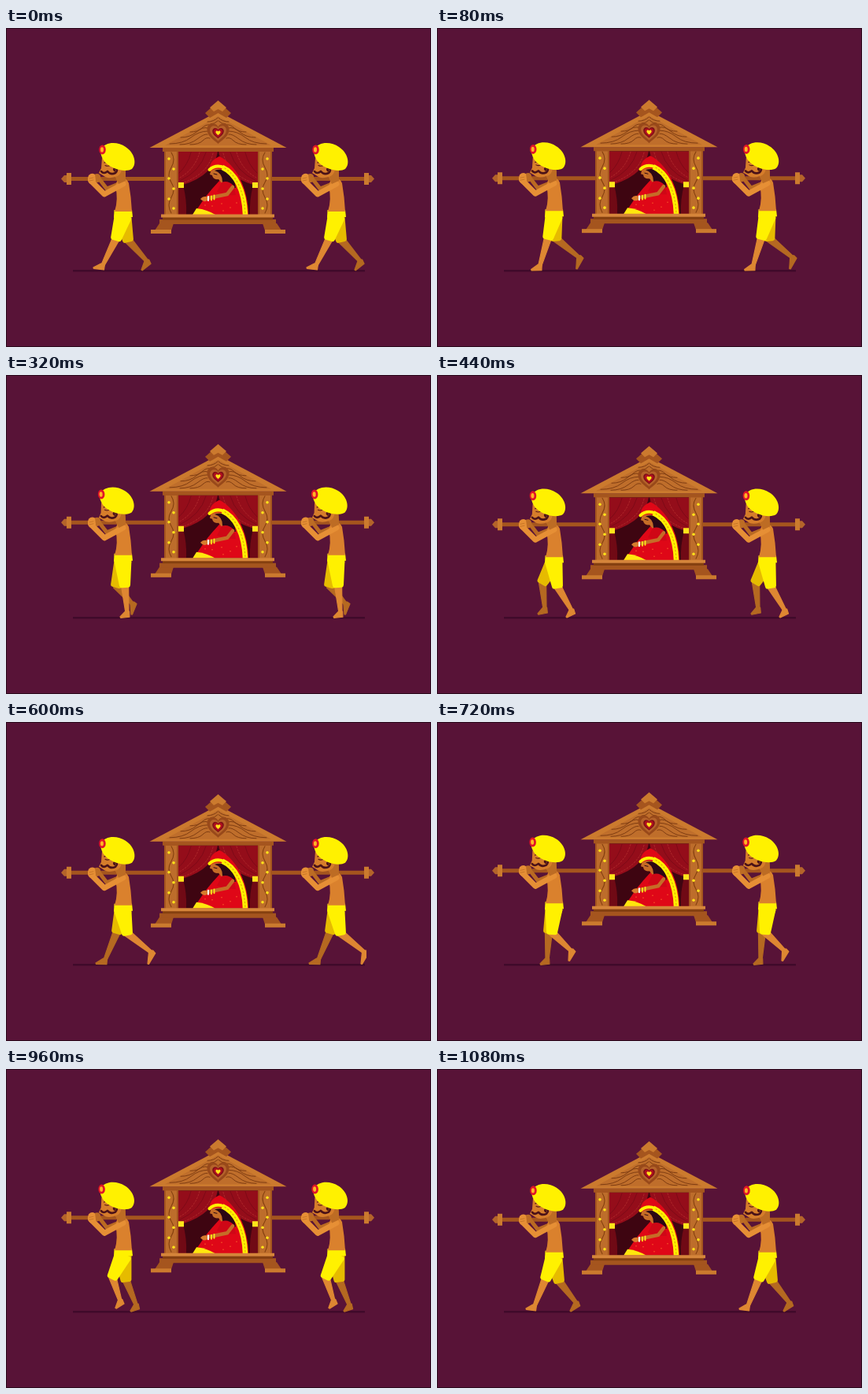
Recreate the animation shown at these times as an HTML page. Size 540x405 px, loop 1120 ms.

```html
<!DOCTYPE html>
<html lang="en">
<head>
<meta charset="utf-8">
<title>Palanquin</title>
<style>
  html, body { margin: 0; width: 100%; height: 100%; overflow: hidden; background: #581337; }
  svg { display: block; width: 100%; height: 100%; }
  .line { fill: none; stroke-linecap: round; stroke-linejoin: round; }
</style>
</head>
<body>
<svg viewBox="0 0 540 405">
  <defs>
    <clipPath id="window"><path d="M219 157H320V237H219Z"/></clipPath>
    <clipPath id="legArea"><path d="M60 200H458V320H60Z"/></clipPath>

    <g id="roofCarving" class="line" stroke="#7f3d12" stroke-width="1">
      <path d="M269 114Q264 119 256 119M269 118Q265 122 260 122"/>
      <path d="M234 132Q244 132 249 127T259 123"/>
      <path d="M222 139Q234 139 242 132T256 127"/>
      <path d="M208 147Q225 147 235 139T256 131"/>
      <path d="M221 148Q234 148 243 141T256 135"/>
      <path d="M234 148Q245 148 250 143T259 140"/>
    </g>

    <g id="side">
      <path d="M201 154H219V237H201Z" fill="#a5551e"/>
      <path d="M203 157H217V237H203Z" fill="#bd6d2b"/>
      <path class="line" d="M210 158Q216 167 210 177T210 196T210 215T210 235" stroke="#85400f" stroke-width="1.1"/>
      <g fill="#ffe21a">
        <circle cx="207" cy="166" r="1.8"/><circle cx="213" cy="179" r="1.8"/>
        <circle cx="207" cy="191" r="1.8"/><circle cx="213" cy="204" r="1.8"/>
        <circle cx="207" cy="217" r="1.8"/><circle cx="213" cy="229" r="1.8"/>
      </g>
      <path d="M195 248H213L210 257H189Z" fill="#a5551e"/>
      <path d="M184 256H210V261H184Z" fill="#cb7a2e"/>
    </g>

    <g id="curtain">
      <path d="M219 200H225Q230 218 229 237H219Z" fill="#700a15"/>
      <path d="M219 157H269Q264 187 225 199H219Z" fill="#940d1a"/>
      <path class="line" d="M254 158Q247 182 221 194M235 158Q231 174 220 184" stroke="#7b0a17" stroke-width=".9"/>
      <path class="line" d="M263 159Q257 185 224 197M246 158Q240 179 221 190" stroke="#b93431" stroke-width=".7" stroke-dasharray="2 2"/>
      <path d="M218 196H226V203H218Z" fill="#ffe51a"/>
    </g>

    <g id="bride">
      <path d="M271 163C262 167 258 173 259 181L272 193L262 204L253 215L238 237H308C308 204 292 173 271 163Z" fill="#df0717"/>
      <path d="M260 182Q267 176 278 181L283 190L274 197L270 192Q263 193 262 187L259 186Z" fill="#c66c27"/>
      <path d="M265 181Q281 176 290 193L292 203Q280 204 275 195Q275 184 265 181Z" fill="#2b0714"/>
      <path class="line" d="M264 185l4 1" stroke="#2b0714"/>
      <path d="M274 196Q282 193 289 200L292 212Q281 213 268 208Z" fill="#cf0716"/>
      <path class="line" d="M288 202L281 211L252 217" stroke="#c66c27" stroke-width="4.500"/>
      <path d="M247 217q4 -5 9 -2v4q-5 3 -9 -2" fill="#d77c2d"/>
      <path class="line" d="M257 214v5" stroke="#fff" stroke-width="2"/>
      <path class="line" d="M261 213.500v5M264.500 212.500v5" stroke="#ffe51a" stroke-width="1.8"/>
      <path class="line" d="M258.500 180Q266 173 277 177" stroke="#fff000" stroke-width="4"/>
      <path class="line" d="M275 177C291 184 303 205 304 237" stroke="#fff000" stroke-width="6.500" style="stroke-linecap:butt"/>
      <path class="line" d="M278 178C291 186 303 206 304 237" stroke="#dfae00" stroke-width="1.2" stroke-dasharray="1.500 3"/>
      <path d="M242 229Q254 230 266 237H237Z" fill="#ffe70d"/>
      <g fill="#ff6b2d">
        <circle cx="262" cy="226" r=".7"/><circle cx="274" cy="223" r=".7"/>
        <circle cx="285" cy="228" r=".7"/><circle cx="293" cy="222" r=".7"/>
        <circle cx="276" cy="232" r=".7"/><circle cx="253" cy="225" r=".7"/>
      </g>
    </g>

    <g id="torso">
      <path class="line" d="M118 191L128 204L143 198" stroke="#ba6a22" stroke-width="5"/>
      <path d="M112 186q6 -3 8 2v6q-4 4 -8 1Z" fill="#bd6c24"/>
      <path d="M142 191Q153 189 156 197Q159 214 160 233H138Q143 217 139 201Z" fill="#da812d"/>
      <path class="line" d="M108 194L125 211L149 198" stroke="#e68f35" stroke-width="7"/>
      <path d="M105 187q4 -4 8 -1l1 8q-3 5 -7 4q-5 -4 -2 -11" fill="#e68f35"/>
      <path class="line" d="M106 191l5 -1M106 194l5 -1" stroke="#ba6a22" stroke-width=".7"/>
    </g>

    <g id="head">
      <path d="M122 165L150 174L152 193L143 197L139 189Q128 192 123 187L118 184L121 178Z" fill="#d67d2b"/>
      <path d="M139 189Q146 187 147 179L152 181V194L143 198Z" fill="#bd6c24"/>
      <path class="line" d="M126 174.500q4 2 7 -1" stroke="#571b16" stroke-width="1.1"/>
      <path class="line" d="M125 171q4 -2 8 0" stroke="#571b16" stroke-width="1.3"/>
      <path class="line" d="M121 182Q124 186 129 182Q133 187 139 184Q143 180 139 178Q136 179 138 181" stroke="#4b1218" stroke-width="2.600"/>
      <path d="M121 154C126 144 142 144 152 151C163 158 167 172 160 179C152 184 132 179 124 168Q119 160 121 154Z" fill="#fff100"/>
      <ellipse cx="122.500" cy="154.500" rx="4.300" ry="6" fill="#e01428"/>
      <ellipse cx="122" cy="154.500" rx="2" ry="3.200" fill="#ffb524"/>
    </g>
  </defs>

  <path d="M0 0H540V405H0Z" fill="#581337"/>
  <path d="M85 307H456V309.500H85Z" fill="#400a2a"/>

  <g class="bob">
    <path d="M82 189H202V194H82ZM337 189H458V194H337Z" fill="#a5551e"/>
    <path d="M70 191.500L74 187H78V196H74ZM468 191.500L464 187H460V196H464Z" fill="#b4642a"/>
    <path d="M77 184H83V199H77ZM455 184H461V199H455Z" fill="#cb7a2e"/>

    <path d="M219 155H320V237H219Z" fill="#3e0511"/>
    <g clip-path="url(#window)">
      <use href="#curtain"/>
      <use href="#curtain" transform="matrix(-1 0 0 1 539 0)"/>
      <use href="#bride"/>
    </g>
    <use href="#side"/>
    <use href="#side" transform="matrix(-1 0 0 1 539 0)"/>
    <path d="M199 152H340V157H199Z" fill="#a5551e"/>

    <path d="M269.500 106L356.500 152H182.500Z" fill="#cb7a2e"/>
    <path d="M269.500 112L337 149H202Z" fill="#bf6e2b"/>
    <path d="M262 100H277L286 108L280 114L269.500 108L259 114L253 108Z" fill="#a5551e"/>
    <path d="M269.500 92L280 101L275 106L269.500 103L264 106L259 101Z" fill="#cb7a2e"/>
    <use href="#roofCarving"/>
    <use href="#roofCarving" transform="matrix(-1 0 0 1 539 0)"/>
    <g id="heart"></g>

    <path d="M195 243H343V249H195Z" fill="#a5551e"/>
    <path d="M199 240H339V243.500H199Z" fill="#85400f"/>
    <path d="M197 236.500H341V240.500H197Z" fill="#d5853a"/>
  </g>

  <g clip-path="url(#legArea)" id="legs"></g>
  <g id="bodies"></g>
  <path d="M.5 .5H539.500V404.500H.5Z" fill="none" stroke="#2b0a1c" stroke-width="1"/>
</svg>
<script>
const LOOP = 1120, STEP = 40, LIFT = 4.4, SPACING = 271;
const $ = id => document.getElementById(id);

// Stride of one leg: time, knee x y, ankle x y, toe x y
const stride = [
  [0, 140, 267, 123, 301, 111, 304],
  [40, 141, 266, 126, 302, 114, 306],
  [160, 142, 266, 140, 302, 131, 307],
  [320, 151, 267, 154, 302, 145, 307],
  [440, 153, 268, 171, 299, 164, 307],
  [520, 155, 269, 177, 297, 169, 307],
  [560, 155, 269, 179, 296, 172, 307],
  [600, 154, 268, 184, 292, 180, 307],
  [720, 146, 267, 170, 290, 167, 303],
  [880, 140, 267, 160, 290, 159, 304],
  [1000, 134, 263, 137, 297, 128, 303],
  [1080, 138, 266, 124, 301, 113, 304]
];

const keyAt = i => {
  const n = stride.length, [time, ...pose] = stride[(i + n) % n];
  return { time: time + Math.floor(i / n) * LOOP, pose };
};

// Smooth periodic interpolation through the stride
function poseAt(time) {
  const t = time % LOOP;
  let i = stride.length - 1;
  while (stride[i][0] > t) i--;
  const [a, b, c, d] = [-1, 0, 1, 2].map(k => keyAt(i + k));
  const span = c.time - b.time, u = (t - b.time) / span;
  const h = u * u * (3 - 2 * u);
  return b.pose.map((v, k) => {
    const m0 = (c.pose[k] - a.pose[k]) / (c.time - a.time) * span;
    const m1 = (d.pose[k] - v) / (d.time - b.time) * span;
    return v * (1 - h) + c.pose[k] * h + u * (1 - u) * ((1 - u) * m0 - u * m1);
  });
}

const poly = points => 'M' + points.map(p => p.map(v => v.toFixed(2)).join(' ')).join('L') + 'Z';

// Limb from a to b with half widths wa and wb
function limb([ax, ay], [bx, by], wa, wb) {
  const len = Math.hypot(bx - ax, by - ay), ux = (bx - ax) / len, uy = (by - ay) / len;
  return poly([
    [ax - uy * wa, ay + ux * wa], [bx - uy * wb, by + ux * wb],
    [bx + uy * wb, by - ux * wb], [ax + uy * wa, ay - ux * wa]
  ]);
}

function foot([ax, ay], [tx, ty]) {
  const len = Math.hypot(tx - ax, ty - ay), ux = (tx - ax) / len, uy = (ty - ay) / len;
  const heel = [ax + uy * 6, ay - ux * 6];
  return poly([[ax - 2.3, ay - 2], [tx, ty], [tx + uy * 1.5, ty - ux * 1.5], heel, [ax + 2.6, ay - 2]]);
}

function leg(time, lift, skin, cloth) {
  const [kx, ky, ax, ay, tx, ty] = poseAt(time);
  const hip = [148.5, 240 - lift], knee = [kx, ky], ankle = [ax, ay];
  const paint = (color, width) =>
    `stroke-linejoin="round" fill="${color}" stroke="${color}" stroke-width="${width}"`;
  return `<g ${paint(skin, 1.2)}>
    <path d="${limb(knee, ankle, 4.6, 2)}"/><path d="${foot(ankle, [tx, ty])}"/></g>
    <path ${paint(cloth, 6)} d="${limb(hip, knee, 8, 4)}"/>`;
}

const heartPath = (s, fill) =>
  `<path transform="translate(269.5 133) scale(${s})" fill="${fill}"
    d="M0 13C-5 8 -13 4 -13 -4C-13 -12 -3 -13 0 -7C3 -13 13 -12 13 -4C13 4 5 8 0 13Z"/>`;
$('heart').innerHTML = heartPath(1.08, '#98491a') + heartPath(.8, '#b5632a') +
  heartPath(.56, '#7a1016') + heartPath(.44, '#b00f1e') + heartPath(.24, '#ffe21a');

$('bodies').innerHTML = [0, SPACING].map(x => `<g transform="translate(${x} 0)"><g class="bob">
  <path d="M137.500 231L160 231L161 240L137 241Z" fill="#fff100"/>
  <use href="#torso"/><use href="#head" class="head"/></g></g>`).join('');

const bobbing = document.querySelectorAll('.bob'), heads = document.querySelectorAll('.head');

function draw(time) {
  const t = Math.floor(time % LOOP / STEP) * STEP;
  const rise = (1 - Math.cos(4 * Math.PI * t / LOOP)) / 2, lift = rise * LIFT;
  bobbing.forEach(g => g.setAttribute('transform', `translate(0 ${-lift})`));
  heads.forEach(g => g.setAttribute('transform', `rotate(${-2.5 * rise} 150 188)`));
  const pair = leg(t + LOOP / 2, lift, '#b56921', '#e6bb00') + leg(t, lift, '#de8732', '#fff100');
  $('legs').innerHTML = [0, SPACING].map(x => `<g transform="translate(${x} 0)">${pair}</g>`).join('');
}

const start = performance.now();
function tick() {
  draw(performance.now() - start);
  requestAnimationFrame(tick);
}
draw(0);
requestAnimationFrame(tick);
</script>
</body>
</html>
```
